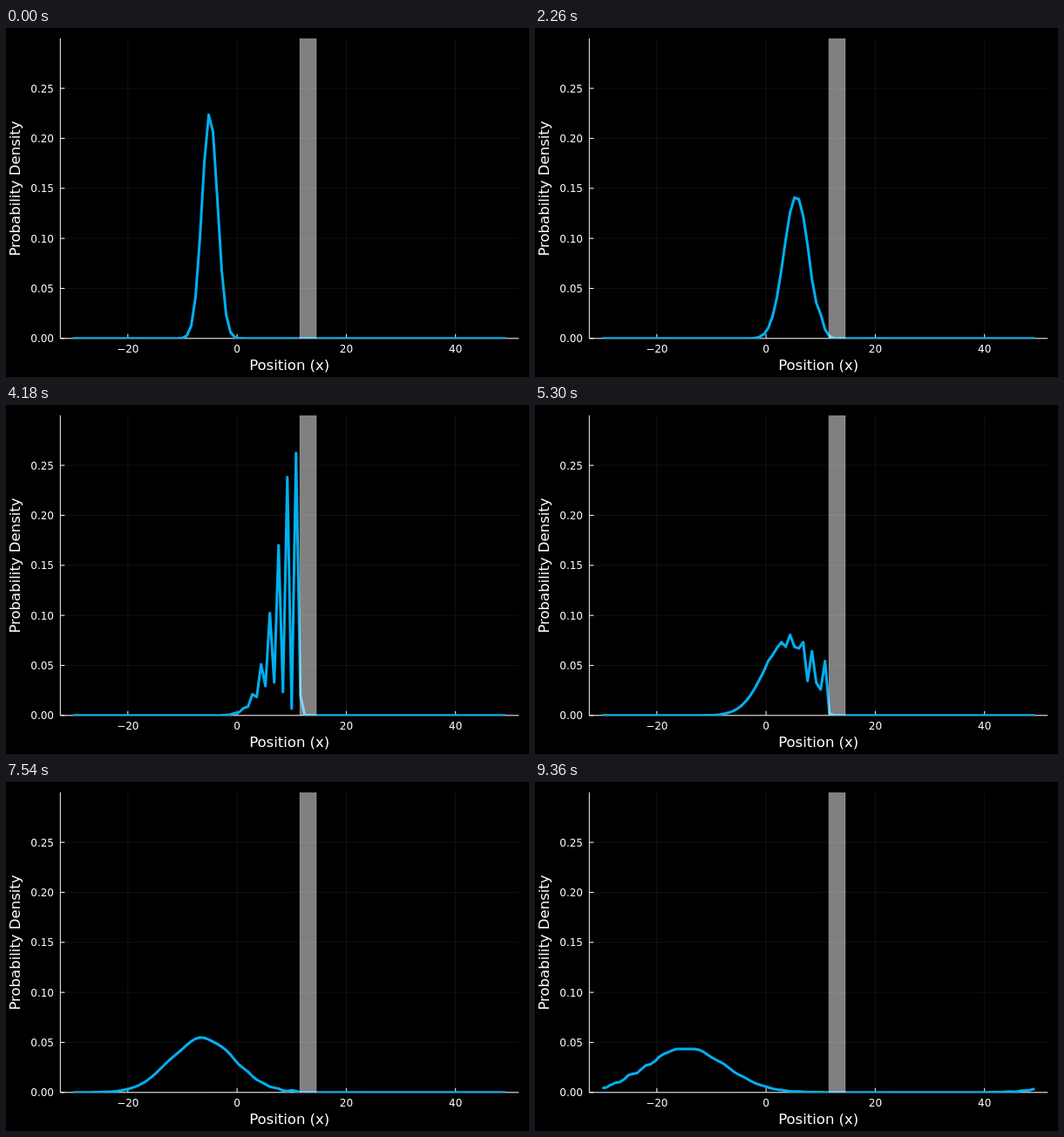
An HTML page with a canvas that plays this animation: 600x400 px, repeating every 9460 ms.

```html
<!DOCTYPE html>
<html lang="en">
<head>
<meta charset="utf-8">
<title>Wave packet at a barrier</title>
<style>
  html, body { margin: 0; width: 100%; height: 100%; overflow: hidden; background: #000; }
  canvas, svg { position: absolute; left: 0; top: 0; width: 600px; height: 400px; }
  text { font-family: "DejaVu Sans", sans-serif; fill: #fff; }
  .tick { font-size: 12px; }
  .label { font-size: 16.5px; text-anchor: middle; }
</style>
</head>
<body>
<canvas id="plot" width="600" height="400"></canvas>
<svg id="text" viewBox="0 0 600 400">
  <text class="label" x="325.2" y="392">Position (x)</text>
  <text class="label" transform="translate(16.3 184) rotate(-90)">Probability Density</text>
</svg>
<script>
const ctx = document.getElementById("plot").getContext("2d");
const svg = document.getElementById("text");

// Plot geometry
const LEFT = 62.3, RIGHT = 588.2, TOP = 11.8, BOTTOM = 355.8;
const px = x => 265.1 + 6.265 * x;
const py = p => BOTTOM - p * (BOTTOM - TOP) / 0.3;
const X_TICKS = [-20, 0, 20, 40];
const Y_TICKS = [0, 0.05, 0.1, 0.15, 0.2, 0.25];

// Physics (hbar = m = 1) on a periodic grid
const N = 100, DX = 0.8, X0 = -30, DT = 0.1, STEPS = 200;
const START = -5, SIGMA = 2, K0 = 10;
const WALL = [11.5, 14.5], HEIGHT = 5;
const xs = Array.from({ length: N }, (_, j) => X0 + DX * j);

// Free propagation over one time step, as a circular convolution kernel
function freeKernel() {
  const re = new Float64Array(N), im = new Float64Array(N);
  for (let d = 0; d < N; d++) {
    for (let m = -N / 2; m < N / 2; m++) {
      const k = 2 * Math.PI * m / (N * DX);
      const a = k * d * DX - k * k * DT / 2;
      re[d] += Math.cos(a) / N;
      im[d] += Math.sin(a) / N;
    }
  }
  return { re, im };
}

function simulate() {
  const kernel = freeKernel();
  const env = xs.map(x => Math.exp(-((x - START) ** 2) / (2 * SIGMA ** 2)));
  const norm = Math.sqrt(env.reduce((s, e) => s + e * e, 0));
  let re = xs.map((x, j) => env[j] / norm * Math.cos(K0 * x));
  let im = xs.map((x, j) => env[j] / norm * Math.sin(K0 * x));
  const phase = xs.map(x => x >= WALL[0] && x <= WALL[1] ? -HEIGHT * DT / 2 : 0);
  const c = phase.map(Math.cos), s = phase.map(Math.sin);

  const kick = () => {
    for (let j = 0; j < N; j++) {
      const r = re[j], i = im[j];
      re[j] = r * c[j] - i * s[j];
      im[j] = r * s[j] + i * c[j];
    }
  };
  const drift = () => {
    const r2 = new Array(N).fill(0), i2 = new Array(N).fill(0);
    for (let j = 0; j < N; j++) {
      for (let l = 0; l < N; l++) {
        const d = (j - l + N) % N;
        r2[j] += kernel.re[d] * re[l] - kernel.im[d] * im[l];
        i2[j] += kernel.re[d] * im[l] + kernel.im[d] * re[l];
      }
    }
    re = r2;
    im = i2;
  };
  const density = () => re.map((r, j) => r * r + im[j] * im[j]);

  const states = [density()];
  for (let n = 0; n < STEPS; n++) {
    kick();
    drift();
    kick();
    states.push(density());
  }
  return states;
}

function addTick(str, x, y, anchor) {
  const t = document.createElementNS(svg.namespaceURI, "text");
  t.setAttribute("class", "tick");
  t.setAttribute("x", x);
  t.setAttribute("y", y);
  t.setAttribute("text-anchor", anchor);
  t.textContent = str;
  svg.appendChild(t);
}

function line(x1, y1, x2, y2, color) {
  ctx.strokeStyle = color;
  ctx.lineWidth = 1;
  ctx.beginPath();
  ctx.moveTo(x1, y1);
  ctx.lineTo(x2, y2);
  ctx.stroke();
}

function drawAxes() {
  const grid = "rgba(255,255,255,0.065)";
  for (const x of X_TICKS) {
    line(px(x), TOP, px(x), BOTTOM, grid);
    line(px(x), BOTTOM, px(x), BOTTOM - 5, "#fff");
  }
  for (const y of Y_TICKS) {
    line(LEFT, py(y), RIGHT, py(y), grid);
    line(LEFT, py(y), LEFT + 5, py(y), "#fff");
  }
  line(LEFT, TOP, LEFT, BOTTOM, "#fff");
  line(LEFT, BOTTOM, RIGHT, BOTTOM, "#fff");
}

function drawCurve(state) {
  ctx.strokeStyle = "#00b0f0";
  ctx.lineWidth = 3;
  ctx.lineJoin = "round";
  ctx.beginPath();
  state.forEach((p, j) => ctx.lineTo(px(xs[j]), py(p)));
  ctx.stroke();
}

function drawWall() {
  const a = px(WALL[0]), b = px(WALL[1]);
  ctx.fillStyle = "rgba(255,255,255,0.5)";
  ctx.fillRect(a, TOP, b - a, BOTTOM - TOP);
  line(a, TOP, a, BOTTOM, "rgba(255,255,255,0.3)");
  line(b, TOP, b, BOTTOM, "rgba(255,255,255,0.3)");
}

// States are held for 20, 100 and 20 ms in turn
const LOOP = 9460;
function stepAt(ms) {
  const t = ms % LOOP, r = t % 140;
  const n = 3 * Math.floor(t / 140) + (r < 20 ? 0 : r < 120 ? 1 : 2);
  return Math.min(n, STEPS);
}

function draw(n) {
  ctx.fillStyle = "#000";
  ctx.fillRect(0, 0, 600, 400);
  drawAxes();
  ctx.save();
  ctx.beginPath();
  ctx.rect(LEFT, TOP, RIGHT - LEFT, BOTTOM + 0.2 - TOP);
  ctx.clip();
  drawCurve(states[n]);
  drawWall();
  ctx.restore();
}

for (const x of X_TICKS) addTick(String(x).replace("-", "\u2212"), px(x), 371.8, "middle");
for (const y of Y_TICKS) addTick(y.toFixed(2), 55, py(y) + 4.4, "end");

const states = simulate();
const begin = performance.now();
let shown = -1;
function tick() {
  const n = stepAt(performance.now() - begin);
  if (n !== shown) draw(shown = n);
  requestAnimationFrame(tick);
}
tick();
</script>
</body>
</html>
```
